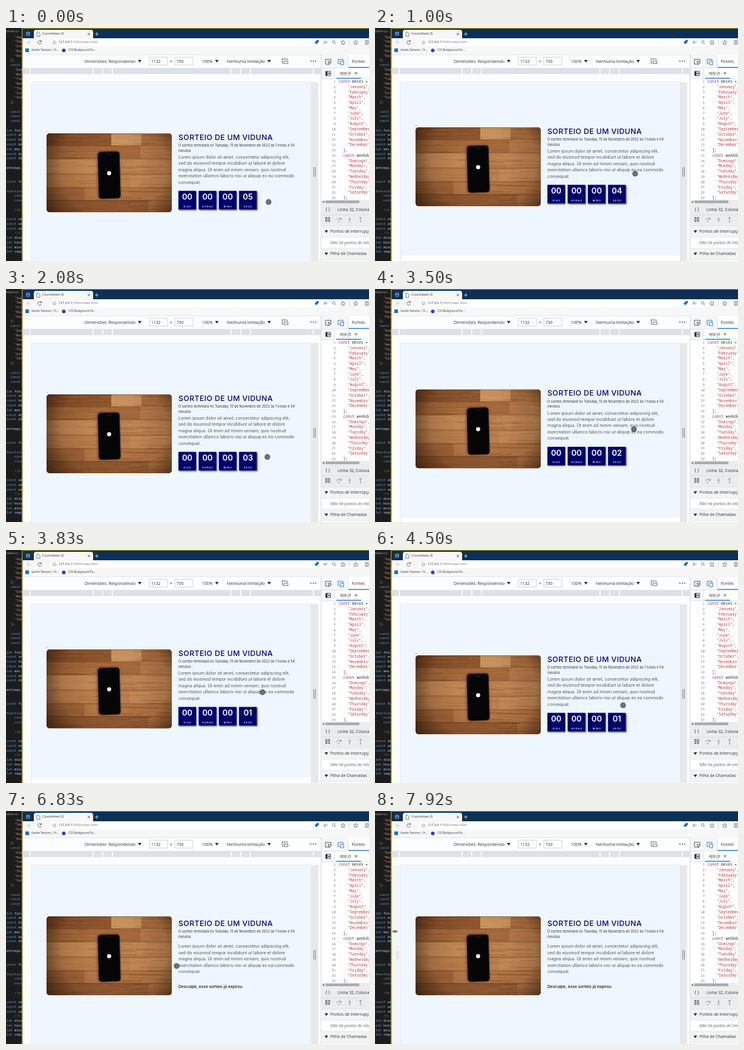
An HTML page with a canvas that plays this animation: 600 px wide and 387 px high, repeating every 8 s.

```html
<!DOCTYPE html>
<html lang="pt">
<head>
<meta charset="utf-8">
<title>Countdown JS</title>
<style>
html, body { margin: 0; width: 100%; height: 100%; overflow: hidden; background: #fff; }
canvas { display: block; }
</style>
</head>
<body>
<canvas id="stage" width="600" height="387"></canvas>
<script>
const c = document.getElementById('stage').getContext('2d');
const LOOP = 8000;
const PAGE = 'Inter, sans-serif', UI = '"Open Sans", sans-serif', MONO = '"Noto Sans Mono", monospace';
const NAVY = '#00006c', INK = '#303338';

// time, x, y
const pointer = [[0, 434, 289], [100, 434, 289], [700, 430, 240], [1000, 430, 242], [1650, 432, 279],
  [2420, 432, 279], [2900, 433, 284], [3200, 431, 276], [3500, 428, 233], [3800, 424, 236],
  [4200, 415, 254], [4500, 410, 258], [5670, 359, 275], [6500, 345, 272], [7600, 55, 205], [7920, 33, 200]];
// time, offset
const scroll = [[0, 0], [150, 0], [650, -10], [1050, -10], [1600, 0], [3250, 0],
  [3500, -8.3], [3620, -10], [3800, -10], [4200, 0]];
const FIRST_TICK = 600;

function at(keys, t) {
  const i = keys.findIndex(k => k[0] > t);
  if (i < 0) return keys[keys.length - 1].slice(1);
  const a = keys[i - 1], b = keys[i];
  const u = (t - a[0]) / (b[0] - a[0]), e = u * u * (3 - 2 * u);
  return a.slice(1).map((v, j) => v + (b[j + 1] - v) * e);
}

function text(s, x, y, size, color = INK, { font = UI, weight = 400, align = 'left', space = 0, style = '' } = {}) {
  c.font = `${style} ${weight} ${size}px ${font}`;
  c.letterSpacing = space + 'px';
  c.textAlign = align;
  c.textBaseline = 'middle';
  c.fillStyle = color;
  c.fillText(s, x, y);
}
// A code line whose leading keyword has its own colour
function code(s, x, y, size, color, keyColor) {
  const key = (s.match(/^ *(const?|let|function)/) || [''])[0];
  text(key, x, y, size, keyColor, { font: MONO });
  text(' '.repeat(key.length) + s.slice(key.length), x, y, size, color, { font: MONO });
}
function rect(x, y, w, h, color) {
  c.fillStyle = color;
  c.fillRect(x, y, w, h);
}
function round(x, y, w, h, r, color) {
  c.beginPath();
  c.roundRect(x, y, w, h, r);
  c.fillStyle = color;
  c.fill();
}
function circle(x, y, r, color) {
  c.beginPath();
  c.arc(x, y, r, 0, 7);
  c.fillStyle = color;
  c.fill();
}
function stroke(d, color = '#444', width = .8) {
  c.strokeStyle = color;
  c.lineWidth = width;
  c.stroke(new Path2D(d));
}
function arrow(x, y, color = INK) {
  c.fillStyle = color;
  c.fill(new Path2D(`M${x - 3} ${y - 2}h6l-3 4.5z`));
}

const editor = [
  '    "Aug', '    "Sep', '    "Oct', '    "Nov', '    "Dec', '  ];', '  const', '    "Dom', '    "Mon', '    "Tue',
  '    "Wed', '    "Thu', '    "Fri', '    "Sat', '  ];', '', '  const', '  const', '  const', '', 'let futu', 'const an',
  'const ho', 'const mi', 'let mes', 'const da', 'const di', '', 'entrega.', '', '', 'const fu', '', 'function',
  '    const', '    cons', '', '    //m', '', 'const um', 'const um', 'const um', '    //c', 'let dias', 'let hora',
  'let minu', 'let segu'];

function drawEditor() {
  rect(0, 0, 28, 387, '#1c1c1d');
  c.save();
  c.beginPath();
  c.rect(0, 0, 26, 387);
  c.clip();
  text('tdown-js ›', 0, 6, 5, '#aaa');
  editor.forEach((s, i) => {
    const color = s.includes('"') ? '#ce9178' : s.includes('//') ? '#6a9955' : s.includes(']') ? '#d4d4d4' : '#9cdcfe';
    code(s, 1, 15 + i * 7.76, 5.4, color, '#569cd6');
  });
  c.restore();
  rect(26, 0, 1.5, 387, '#b59d10');
}

function drawBrowser() {
  rect(27.5, 0, 573, 17, '#0d3156');
  rect(26, 0, 574, 1, '#b59d10');
  stroke('M34 7h5v5h-5zM34 9h5', '#dfe7ef', .7);
  round(46, 3, 98, 16, [4, 4, 0, 0], '#f7f7f7');
  stroke('M51 7h3l2 2v5h-5z', '#555', .7);
  text('Countdown JS', 60, 10, 5.5);
  stroke('M135 8l4 4m0-4l-4 4');
  stroke('M150 7v6M147 10h6', '#e8edf3');

  rect(27.5, 17, 573, 27, '#f7f7f7');
  stroke('M41 24h-6m3-3l-3 3l3 3', '#bbb');
  stroke('M58 22a3 3 0 1 0 .5 3M58.5 20v2.5h-2.5', '#555');
  round(73, 18.5, 480, 11.5, 5, '#fff');
  stroke('M77.5 24a2.5 2.5 0 1 0 5 0a2.5 2.5 0 1 0 -5 0M80 23.5v2', '#666', .6);
  text('127.0.0.1', 87, 24, 5.4);
  text(':5500/index.html', 109.5, 24, 5.4, '#777');
  c.fillStyle = '#1673c9';
  c.fill(new Path2D('M510 24l4-4h3v3l-4 4z'));
  text('A', 525, 24, 6.5, '#555');
  stroke('M530 21q1.5 2 0 4', '#555', .6);
  stroke('M539.5 23a2.2 2.2 0 1 0 4.4 0a2.2 2.2 0 1 0 -4.4 0M543.5 25l2 2', '#555', .7);
  for (const x of [557, 578]) stroke(`M${x} 20.5l1.1 2.3l2.4.3l-1.8 1.7l.5 2.5l-2.2-1.2l-2.2 1.2l.5-2.5l-1.8-1.7l2.4-.3z`, '#555', .7);
  rect(567, 20, .6, 8, '#ccc');
  stroke('M594 21h5v6h-5zM596.5 21v6', '#555', .7);

  rect(32, 34, 6, 6, '#1670d2');
  text('Gentle Textures | Fr...', 42, 37.2, 4.5);
  circle(95.5, 37.2, 3, '#3d34c4');
  text('CSS Background Pa...', 103, 37.2, 4.6);

  rect(27.5, 44, 573, 343, '#fcfdff');
  rect(27.5, 44, 573, .7, '#dadce0');
  text('Dimensões: Respondendo', 130, 55.8, 6.9);
  arrow(221, 55);
  for (const [x, s] of [[237, '1132'], [279, '730']]) {
    stroke(`M${x} 48.5h30v13h-30z`, '#c5c8cd', .8);
    text(s, x + 3, 55.8, 6.7);
  }
  text('×', 273, 56, 7, INK, { align: 'center' });
  text('100%', 324, 55.8, 6.8);
  arrow(348.5, 55);
  text('Nenhuma limitação', 365, 55.8, 6.9);
  arrow(435, 55);
  stroke('M458 58.5h-1.5v-7.5h4.5v2M459.5 55h6.5v4h-6.5zM462.5 51.5h2.5v2');
  for (const x of [504, 508, 512]) circle(x, 55, .9, '#444');
  rect(27.5, 66, 493, .7, '#e0e2e6');
  rect(27.5, 67, 493, 9.5, '#dde0e7');
  for (const x of [40, 144, 160, 176]) {
    rect(x - 1, 67, 1.6, 9.5, '#fff');
    rect(547 - x, 67, 1.6, 9.5, '#fff');
  }
}

const months = 'January February March April May June July August September October Novembro December'.split(' ');
const days = 'Domingo Monday Tuesday Wednesday Thursday Friday Saturday'.split(' ');
const item = s => `    "${s}",`;
const script = ['const meses =', ...months.map(item), '  ];', '  const weekdays', ...days.map(item), '  ];'];

function drawTools() {
  rect(521, 44, 79, 343, '#fff');
  rect(521, 44, 79, 40, '#f5f6f7');
  rect(520.5, 44, .8, 343, '#c8cbd0');
  stroke('M534 60h-6v-8h9v4M532 55l6 2.5l-2.5 1l-1 2.5z', '#444', .9);
  stroke('M549 52h8v3M549 52v7h3M553 55h5v6h-5z', '#1a73d0', .9);
  rect(565.5, 45, 34.5, 21, '#fff');
  rect(565.5, 47, .7, 17, '#d0d3d8');
  text('Fontes', 571.5, 55.8, 6.9);
  rect(566, 64.8, 34, 1.4, '#1a73d0');
  rect(521, 66.4, 79, .6, '#d8dade');
  stroke('M528.5 72h8v7h-8zM531 72v7', '#333', .9);
  c.fillStyle = '#333';
  c.fill(new Path2D('M528.5 72h2.5v7h-2.5zM532 75.5l3-2v4z'));
  rect(543, 67, 57, 17, '#fff');
  rect(543, 67, .7, 17, '#d8dade');
  text('app.js', 552, 75.3, 6.6);
  stroke('M576.5 73l4 4m0-4l-4 4', '#333', .9);
  rect(521, 84, 79, .7, '#d8dade');
  rect(546, 82.8, 41, 1.2, '#1a73d0');

  c.save();
  c.beginPath();
  c.rect(521, 84.5, 79, 201);
  c.clip();
  script.forEach((s, i) => {
    const y = 89.2 + i * 8.78;
    text(i + 1, 545, y, 5.7, '#777', { font: MONO, align: 'right' });
    code(s, 549.8, y, 6.2, s.includes('"') ? '#c0353a' : '#333', '#8a2b8a');
  });
  c.restore();

  rect(521, 285.5, 79, 6.5, '#ececec');
  rect(528, 286.5, 56, 4.5, '#a9abae');
  c.fillStyle = '#666';
  c.fill(new Path2D('M526 287v4l-3-2z'));
  rect(521, 292, 79, 36.5, '#ebecee');
  rect(521, 328.5, 79, 18.5, '#f2f3f4');
  text('{ }', 528, 301.5, 7.5);
  text('Linha 32, Coluna 1', 548, 302.3, 6.8);
  rect(521, 310, 79, .6, '#d4d6da');
  stroke('M528.5 314.5h2v7h-2zM533 314.5h2v7h-2z', '#333', .8);
  stroke('M546 319q4-6 8-1m0-3v3h-3M568 314v5m-2-2l2 2l2-2M586 320v-6m-2 2l2-2l2 2', '#888', .9);
  for (const x of [550, 568, 586]) circle(x, 321.5, 1, '#888');
  rect(521, 328.5, 79, .6, '#d4d6da');
  arrow(529.5, 338);
  text('Pontos de interrupção', 536, 338.4, 6.8);
  rect(521, 347, 79, .6, '#d8dade');
  text('Não há pontos de interrupção', 536, 357, 6.7, '#666', { style: 'italic' });
  rect(521, 366, 79, 18.5, '#f2f3f4');
  rect(521, 365.5, 79, .6, '#d8dade');
  arrow(529.5, 375);
  text('Pilha de Chamadas', 536, 375.4, 6.8);
  rect(521, 384.5, 79, .6, '#d8dade');
}

function drawPhoto() {
  c.save();
  c.beginPath();
  c.roundRect(67, 175, 207, 131, 5);
  c.clip();
  // top edge, left tone, right tone, joint
  const planks = [[175, '#8f552d', '#c9935f', 174], [195, '#a4683a', '#b5794a', 222],
    [217, '#c08653', '#bb8150', 190], [242, '#b87c4b', '#bf8452', 205],
    [265, '#a2663a', '#b47645', 130], [286, '#935a32', '#a5693c', 235]];
  for (const [y, a, b, x] of planks) {
    rect(67, y, 207, 26, a);
    rect(x, y, 274 - x, 26, b);
    rect(67, y, 207, .8, '#562d1290');
  }
  rect(224, 175, 50, 20, '#a96d3f');
  let seed = 7;
  const rnd = () => (seed = seed * 16807 % 2147483647) / 2147483647;
  for (let i = 0; i < 220; i++) {
    rect(50 + rnd() * 215, 175 + rnd() * 131, 15 + rnd() * 60, .4 + rnd() * .8, i % 2 ? '#52280f30' : '#e0aa7630');
  }
  const shade = c.createRadialGradient(178, 232, 45, 178, 232, 128);
  shade.addColorStop(0, '#1c0b0200');
  shade.addColorStop(.5, '#1c0b0226');
  shade.addColorStop(1, '#1c0b02a8');
  rect(67, 175, 207, 131, shade);
  c.translate(171, 244.2);
  c.rotate(-.025);
  c.shadowColor = '#1a0a03a0';
  c.shadowBlur = 4;
  c.shadowOffsetX = -1;
  round(-18.3, -39, 36, 78, 5, '#050506');
  c.shadowColor = 'transparent';
  stroke('M-17 -33v-2q0-3 3-3h28q3 0 3 3v68', '#33302f', .7);
  rect(-4, -35, 8, .8, '#333');
  circle(-.5, -3, 3.4, '#f6f6f6');
  c.restore();
}

const lorem = ['Lorem ipsum dolor sit amet, consectetur adipiscing elit,',
  'sed do eiusmod tempor incididunt ut labore et dolore',
  'magna aliqua. Ut enim ad minim veniam, quis nostrud',
  'exercitation ullamco laboris nisi ut aliquip ex ea commodo', 'consequat.'];

function drawPage(t) {
  const left = 4 - Math.floor((t - FIRST_TICK) / 1000);
  const over = left < 0, d = over ? 5 : 0;
  const o = { font: PAGE };
  rect(41.5, 89, 464, 298, '#e9edf3');
  c.save();
  c.beginPath();
  c.rect(43, 90, 461, 297);
  c.clip();
  rect(43, 90, 461, 297, '#fff');
  c.translate(0, at(scroll, t)[0]);
  rect(43, 80, 461, 308, '#eef6ff');
  rect(67.5, 171.7, .9, .9, '#333');
  drawPhoto();
  text('SORTEIO DE UM VIDUNA', 285, 182 + d, 12.3, '#00007c', { font: PAGE, weight: 500, space: .4 });
  text('O sorteio terminará no Tuesday, 15 de Novembro de 2022 às 1 horas e 54', 285, 195.5 + d, 5.55, '#333', o);
  text('minutos', 285, 203.9 + d, 5.55, '#333', o);
  lorem.forEach((s, i) => text(s, 285, 214.8 + 2.1 * d + i * 10.4, 7.05, '#51565c', o));
  if (over) text('Desculpe, esse sorteio já expirou', 285, 291.5, 6.7, '#111', { font: PAGE, weight: 500 });
  else ['DIAS', 'HORAS', 'MINS', 'SEGS'].forEach((label, i) => {
    const x = 285 + i * 33.4;
    c.shadowColor = '#00000090';
    c.shadowBlur = 2;
    c.shadowOffsetX = c.shadowOffsetY = 1.2;
    rect(x, 270.5, 29.2, 30.8, NAVY);
    c.shadowColor = 'transparent';
    text(i < 3 ? '00' : '0' + left, x + 14.6, 281.2, 13, '#fff', { font: PAGE, weight: 600, align: 'center' });
    text(label, x + 15, 296.3, 4, '#fff', { font: PAGE, weight: 500, align: 'center', space: .9 });
  });
  c.restore();
  rect(504, 90, 12, 297, '#e7e8ea');
  stroke('M508.8 231v16M511.4 231v16', '#777', .9);
}

function drawPointer(t) {
  const [x, y] = at(pointer, t);
  if (x < 43) {
    rect(28, 90, 13.5, 297, '#f3f5f8');
    stroke('M36 232v14M38.5 232v14', '#c9ccd1', .8);
    stroke(`M${x - 4} ${y}h8m-2-2l2 2l-2 2M${x - 2} ${y - 2}l-2 2l2 2M${x - .8} ${y - 2.5}v5M${x + .8} ${y - 2.5}v5`, '#222', .7);
  } else {
    circle(x, y, 4.7, '#45494fe0');
    circle(x, y, 3.6, '#6f747be0');
  }
}

function frame(now) {
  const t = now % LOOP;
  drawEditor();
  drawBrowser();
  drawPage(t);
  drawTools();
  drawPointer(t);
  requestAnimationFrame(frame);
}
requestAnimationFrame(frame);
</script>
</body>
</html>
```
